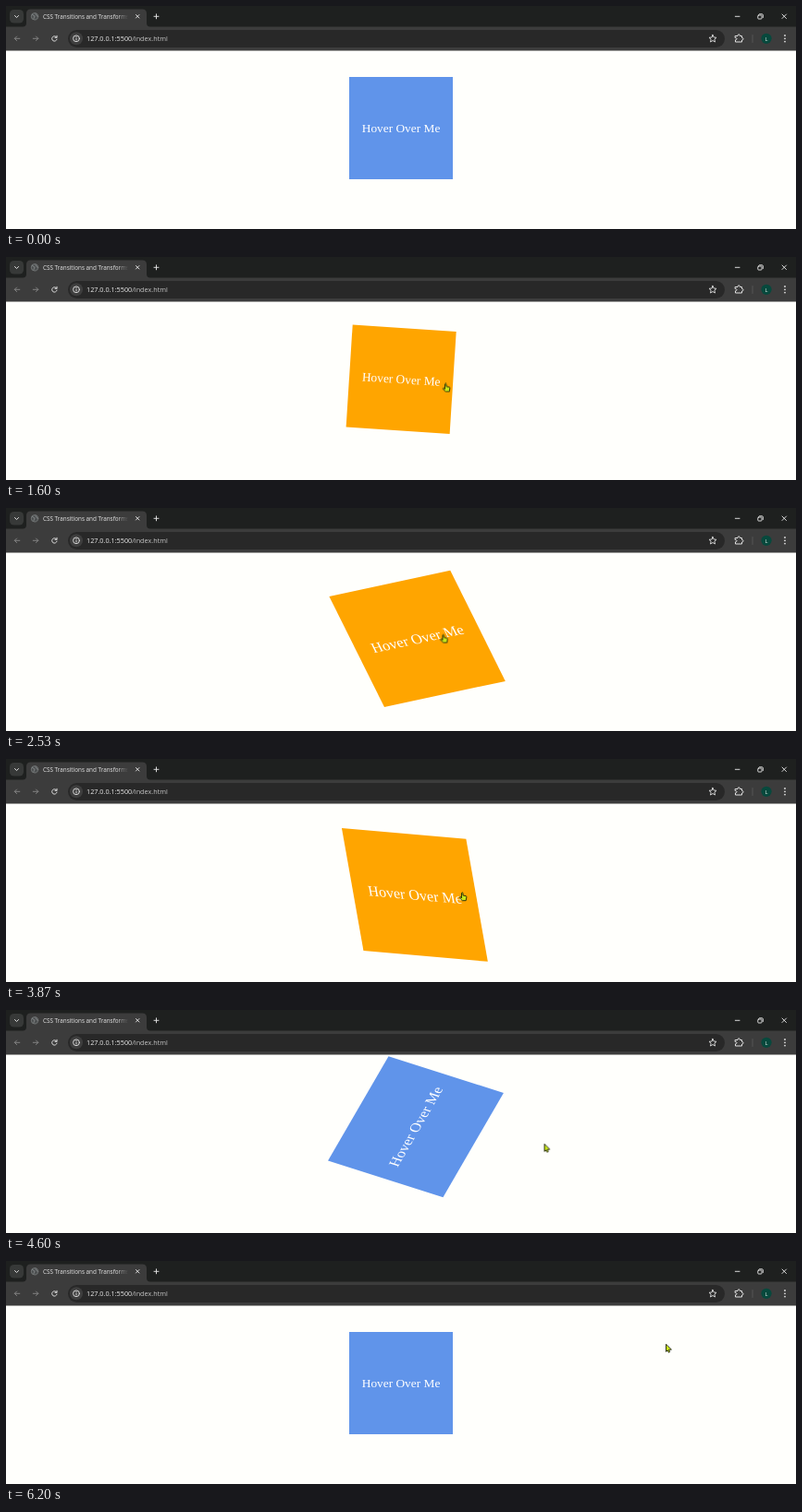
These frames come from a looping animation (854 by 242 pixels, 6.33 s). An HTML page:

```html
<!DOCTYPE html>
<html lang="en">
<head>
<meta charset="utf-8">
<title>CSS Transitions and Transforms</title>
<style>
@property --p { syntax: "<number>"; inherits: false; initial-value: 0; }
html, body { margin: 0; width: 100%; height: 100%; overflow: hidden; }
body { position: relative; background: #fffffc; }
svg { position: absolute; left: 0; top: 0; overflow: visible; }
svg text { font-family: "Open Sans", "Noto Sans", sans-serif; }

.box, .cursor, .arrow, .hand { animation: 6.33s linear infinite paused; }
.box {
  position: absolute; left: 371.3px; top: 76.8px; width: 111.5px; height: 111.5px;
  display: flex; align-items: center; justify-content: center;
  font: 13.37px "Liberation Serif", "Times New Roman", serif;
  color: #fff; white-space: nowrap;
  transform: rotate(calc(var(--p) * 360deg))
    translate(calc(var(--p) * 14.9px), calc(var(--p) * 14.9px))
    scale(calc(1 + var(--p) * .2))
    skew(calc(var(--p) * 10deg), calc(var(--p) * 5deg));
  animation-name: spin, paint;
}
.cursor { animation-name: move; }
.arrow { animation-name: arrow; }
.hand { animation-name: hand; }

@keyframes spin {
  0%, 24.64% { --p: 0; animation-timing-function: cubic-bezier(.4, .1, .29, 1); }
  45.2%, 64.2% { --p: 1; }
  68.4%, 70.57% { --p: .93; animation-timing-function: cubic-bezier(.36, .1, .45, 1); }
  83.2%, 100% { --p: 0; }
}
@keyframes paint {
  0%, 65.2%, 100% { background: #6094ea; animation-timing-function: step-end; }
  25.2% { background: #ffa500; animation-timing-function: step-end; }
}
@keyframes arrow {
  0%, 65.2%, 100% { opacity: 1; animation-timing-function: step-end; }
  25.2% { opacity: 0; animation-timing-function: step-end; }
}
@keyframes hand {
  0%, 65.2%, 100% { opacity: 0; animation-timing-function: step-end; }
  25.2% { opacity: 1; animation-timing-function: step-end; }
}
@keyframes move {
  0% { opacity: 0; transform: translate(756px, 222px); animation-timing-function: step-end; }
  2.1% { opacity: 1; transform: translate(756px, 222px); animation-timing-function: step-end; }
  10.5% { transform: translate(527px, 143px); animation-timing-function: step-end; }
  20% { transform: translate(497px, 139px); animation-timing-function: step-end; }
  25.2% { transform: translate(473px, 136.5px); animation-timing-function: step-end; }
  26.3% { transform: translate(470.5px, 136.5px); animation-timing-function: step-end; }
  61% { transform: translate(491px, 144px); animation-timing-function: step-end; }
  65.2% { transform: translate(506px, 146px); }
  68.4% { transform: translate(548px, 146px); }
  72.6% { transform: translate(581px, 145px); }
  78.9%, 93.7% { transform: translate(623px, 150px); }
  97.9%, 100% { opacity: 1; transform: translate(713px, 90px); }
}
</style>
</head>
<body>
<div class="box">Hover Over Me</div>

<svg width="854" height="242" viewBox="0 0 854 242" fill="none" stroke-linecap="round" stroke-linejoin="round">
  <defs>
    <linearGradient id="fade" gradientUnits="userSpaceOnUse" x1="121" x2="132" y1="0" y2="0">
      <stop stop-color="#e6e6e6"/><stop offset="1" stop-color="#e6e6e6" stop-opacity="0"/>
    </linearGradient>
  </defs>
  <path fill="#1e201f" d="M0 0H854V23H0Z"/>
  <path fill="#3c3c3c" d="M0 22.5H18Q22 22.5 22 18.500V8Q22 3.500 26.500 3.500H147.500Q152 3.500 152 8V18.500Q152 22.500 156 22.500H854V48.500H0Z"/>
  <rect x="4" y="4" width="15" height="14.500" rx="4.500" fill="#373938"/>
  <rect x="67" y="26" width="710" height="19" rx="9.500" fill="#282828"/>
  <circle cx="76" cy="35.300" r="7" fill="#3e3e3e"/>

  <!-- tab strip -->
  <path stroke="#e0e0e0" d="M9.500 10.500L11.500 12.500L13.500 10.500"/>
  <circle cx="31" cy="11.300" r="3.700" fill="#4c4f50" stroke="#7d8081" stroke-width=".8"/>
  <path stroke="#85888a" stroke-width=".9" d="M28.500 9.500L31 11L30 13.500M32 8.500L33.500 11"/>
  <text x="40" y="13.700" font-size="6.350" fill="url(#fade)">CSS Transitions and Transforms</text>
  <g stroke="#e2e2e2" stroke-width=".95">
    <path d="M140.500 9.500L144 13M144 9.500L140.500 13M160 11.300H165M162.500 8.800V13.800"/>
    <path d="M788.300 11.300H793M839 9L843.500 13.500M843.500 9L839 13.500"/>
    <path d="M814.500 8.800H817.300Q818.300 8.800 818.300 9.800V12.500"/>
    <rect x="812.800" y="10" width="4.200" height="4" rx=".8"/>
  </g>

  <!-- toolbar -->
  <path stroke="#828282" d="M14.800 35.300H9.300M11.600 33L9.300 35.300L11.600 37.600M29.300 35.300H34.800M32.500 33L34.800 35.300L32.500 37.600"/>
  <path stroke="#dcdcdc" d="M54.700 34A2.700 2.700 0 1 0 55 36.200M55 32.300V34.300H53"/>
  <circle cx="76" cy="35.300" r="3.400" stroke="#e4e4e4" stroke-width=".9"/>
  <path stroke="#e4e4e4" stroke-width=".9" d="M76 35V37M76 33.500V33.600"/>
  <text x="87" y="38" font-size="7.250" fill="#ececec">127.0.0.1:5500<tspan fill="#c6c6c6">/index.html</tspan></text>
  <path stroke="#e0e0e0" stroke-width=".9" d="M764 31.300L765.200 34L768 34.300L765.900 36.200L766.500 39L764 37.500L761.500 39L762.100 36.200L760 34.300L762.800 34Z"/>
  <path stroke="#e0e0e0" d="M788.500 32.500H791Q791 30.800 792.200 30.800Q793.400 30.800 793.400 32.500H795.500V34.500Q797 34.500 797 35.700Q797 37 795.500 37V39H788.500V36.800Q790 36.700 790 35.600Q790 34.500 788.500 34.400Z"/>
  <path stroke="#5c5c5c" stroke-width=".8" d="M807 31.500V39.500"/>
  <circle cx="822" cy="35.300" r="5.600" fill="#07493d"/>
  <text x="822" y="37.500" font-size="5.800" fill="#e4f0ec" text-anchor="middle">L</text>
  <g fill="#e0e0e0">
    <circle cx="842" cy="32" r=".9"/><circle cx="842" cy="35.300" r=".9"/><circle cx="842" cy="38.600" r=".9"/>
  </g>

  <g class="cursor" fill="#c8e619" stroke="#20240a" stroke-width=".9">
    <path class="arrow" d="M.5 .6V8.400L2.200 6.900L3.400 9.300L4.700 8.600L3.600 6.400L6 6.100Z"/>
    <path class="hand" d="M1.500 6.500V1.400Q2.200 .3 3 1.400V4L6.300 4.700Q7 5 6.900 5.900L6.200 9.700H2.400L-.9 6.500Q-.6 5.200 .6 5.800Z"/>
  </g>
</svg>

<script>
const LOOP = 6330, STEPS = 95, STEP = LOOP / STEPS;
const anims = document.getAnimations();

function draw() {
  const i = Math.floor((performance.now() + 5) / STEP) % STEPS;
  for (const a of anims) a.currentTime = (i + .05) * STEP;
  requestAnimationFrame(draw);
}
draw();
</script>
</body>
</html>
```
